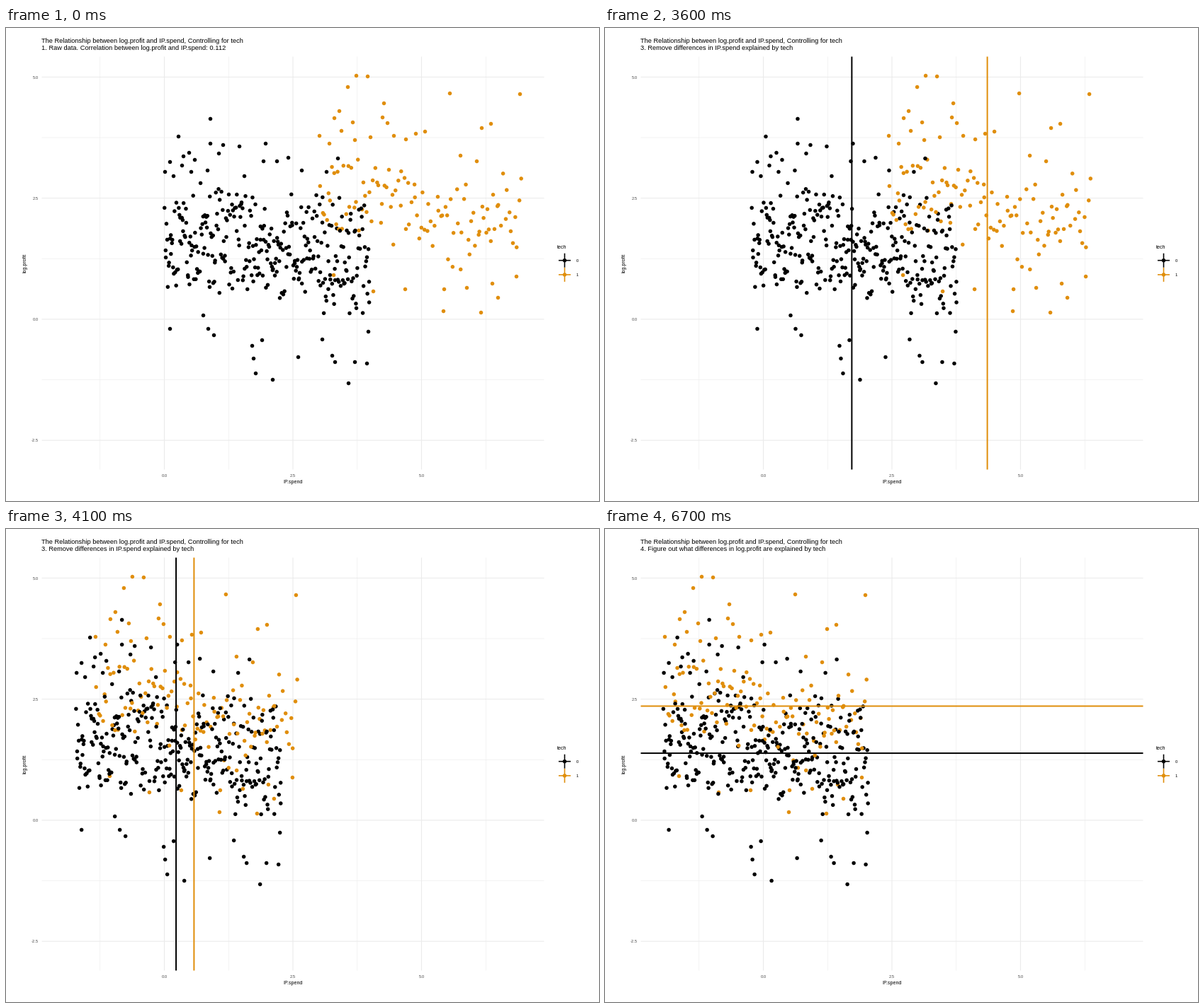
A matplotlib script for the animation above (8000 ms loop, 837 px wide and 669 px high).

```python
import numpy as np
import matplotlib.pyplot as plt
from matplotlib.animation import FuncAnimation

W, H, DPI = 837, 669, 64
PX = 72 / DPI  # one pixel in points
STEP, LOOP = 100, 8000
BLACK, ORANGE, GRID = "#000000", "#E08E0B", "#EBEBEB"
LEFT, RIGHT, TOP, BOTTOM = 50, 759, 40, 624
X0, Y0, UNIT_X, UNIT_Y = 223.0, 411.4, 72.6, 68.5
MEAN_X = {BLACK: 364.4, ORANGE: 581.0}
MEAN_Y = {BLACK: 316.6, ORANGE: 250.0}

TITLE = "The Relationship between log.profit and IP.spend, Controlling for tech"
STAGES = [
    (0, "1. Raw data. Correlation between log.profit and IP.spend: 0.112"),
    (500, "2. Figure out what differences in IP.spend are explained by tech"),
    (3500, "3. Remove differences in IP.spend explained by tech"),
    (6400, "4. Figure out what differences in log.profit are explained by tech"),
]

# Points on the rim of each cloud; the dense middle is sampled.
BLACK_RIM = [
    (288, 128), (243, 153), (288, 163), (306, 165), (329, 167), (366, 163),
    (300, 177), (250, 181), (258, 176), (266, 186), (231, 189), (248, 194),
    (363, 188), (382, 188), (398, 183), (468, 184), (417, 201), (452, 203),
    (224, 203), (236, 209), (261, 203), (284, 201), (336, 209),
    (231, 425), (285, 425), (293, 434), (347, 449), (361, 441), (349, 467),
    (352, 488), (376, 497), (412, 465), (446, 440), (460, 463), (464, 472),
    (492, 472), (509, 474), (483, 502), (511, 429), (278, 406),
]
ORANGE_RIM = [
    (494, 67), (510, 68), (482, 83), (626, 92), (725, 93), (533, 106),
    (470, 117), (463, 127), (531, 126), (538, 134), (489, 133), (684, 135),
    (671, 141), (473, 145), (442, 152), (514, 154), (547, 152), (578, 149),
    (591, 146), (564, 157), (492, 158), (456, 163), (641, 180), (664, 188),
    (518, 372), (563, 369), (617, 400), (670, 402), (694, 381), (618, 369),
    (650, 367), (686, 361), (720, 351), (462, 349),
]

rng = np.random.default_rng(12)


def sample_cloud(count, x_range, center, spread, upper, lower):
    """Uniform in x, sloping normal in y, kept between two slanted edges."""
    xs = x_range[0] + (np.arange(count) + rng.random(count)) / count * np.ptp(x_range)
    points = []
    for x in xs:
        dx = x - x_range[0]
        low, high = upper[0] + upper[1] * dx, lower[0] + lower[1] * dx
        y = -1
        while not low < y < high:
            y = rng.normal(center[0] + center[1] * dx, spread)
        points.append((x, y))
    return points


black = BLACK_RIM + sample_cloud(312, (223, 513), (288, 0.2), 58, (215, 0.07), (365, 0.19))
orange = ORANGE_RIM + sample_cloud(104, (442, 727), (232, 0.16), 50, (168, 0.14), (335, 0.03))
order = rng.permutation(len(black) + len(orange))
points = np.array(black + orange, float)[order]
colors = np.array([BLACK] * len(black) + [ORANGE] * len(orange))[order]
offsets = np.array([MEAN_X[c] - X0 for c in colors])

plt.rcParams["font.family"] = "Liberation Sans"
fig = plt.figure(figsize=(W / DPI, H / DPI), dpi=DPI, facecolor="white")
ax = fig.add_axes([0, 0, 1, 1])
ax.set_xlim(-0.5, W - 0.5)
ax.set_ylim(H - 0.5, -0.5)
ax.axis("off")


def line(xs, ys, color, width, z):
    return ax.plot(xs, ys, color=color, lw=width * PX, zorder=z, snap=False,
                   solid_capstyle="butt")[0]


def label(x, y, text, size, color="black", **kw):
    return ax.text(x, y, text, fontsize=size * PX, color=color, **kw)


def dots(xy, color):
    return ax.scatter(xy[:, 0], xy[:, 1], s=(5.5 * PX) ** 2, c=color,
                      edgecolors="none", zorder=3)


# Grid and tick labels
for i in range(-1, 6):
    x = X0 + 1.25 * i * UNIT_X
    major = i % 2 == 0
    line([x, x], [TOP, BOTTOM], GRID, 1.1 if major else 0.55, 1)
    if major:
        label(x, 634.2, f"{1.25 * i:.1f}", 5.9, "#4D4D4D", ha="center")
for i in range(-2, 5):
    y = Y0 - 1.25 * i * UNIT_Y
    major = i % 2 == 0
    line([LEFT, RIGHT], [y, y], GRID, 1.1 if major else 0.55, 1)
    if major:
        label(45, y + 2.1, f"{1.25 * i:.1f}", 5.9, "#4D4D4D", ha="right")

label(50, 20.2, TITLE, 9.3)
subtitle = label(50, 30.5, "", 9.3)
label(404.5, 643.5, "IP.spend", 7.1, ha="center")
label(26.5, 332, "log.profit", 7.1, rotation=90, ha="center", va="center")

# Legend
label(777.5, 311.5, "tech", 7.1)
for y, color, name in [(328.2, BLACK, "0"), (348.4, ORANGE, "1")]:
    line([779.5, 796.5], [y, y], color, 1.6, 3)
    line([788, 788], [y - 10, y + 10], color, 1.6, 3)
    dots(np.array([[788, y]]), color)
    label(804, y + 2.1, name, 5.9)

cloud = dots(points, colors)
v_lines = {c: line([0, 0], [TOP, BOTTOM], c, 2, z) for c, z in [(ORANGE, 4), (BLACK, 5)]}
h_lines = {c: line([LEFT, RIGHT], [MEAN_Y[c]] * 2, c, 2, 4) for c in (ORANGE, BLACK)}


def update(frame):
    t = frame * STEP
    subtitle.set_text([text for start, text in STAGES if t >= start][-1])
    progress = np.clip((t - 3400) / 900, 0, 1)
    eased = (1 - np.cos(np.pi * progress)) / 2
    cloud.set_offsets(np.column_stack([points[:, 0] - eased * offsets, points[:, 1]]))
    for color, item in v_lines.items():
        x = MEAN_X[color] - eased * (MEAN_X[color] - X0)
        item.set_xdata([x, x])
        item.set_visible(800 <= t < 6400)
    for item in h_lines.values():
        item.set_visible(t >= 6700)
    return [subtitle, cloud, *v_lines.values(), *h_lines.values()]


anim = FuncAnimation(fig, update, frames=LOOP // STEP, interval=STEP,
                     repeat=True, repeat_delay=0, blit=False)
plt.show()
```
